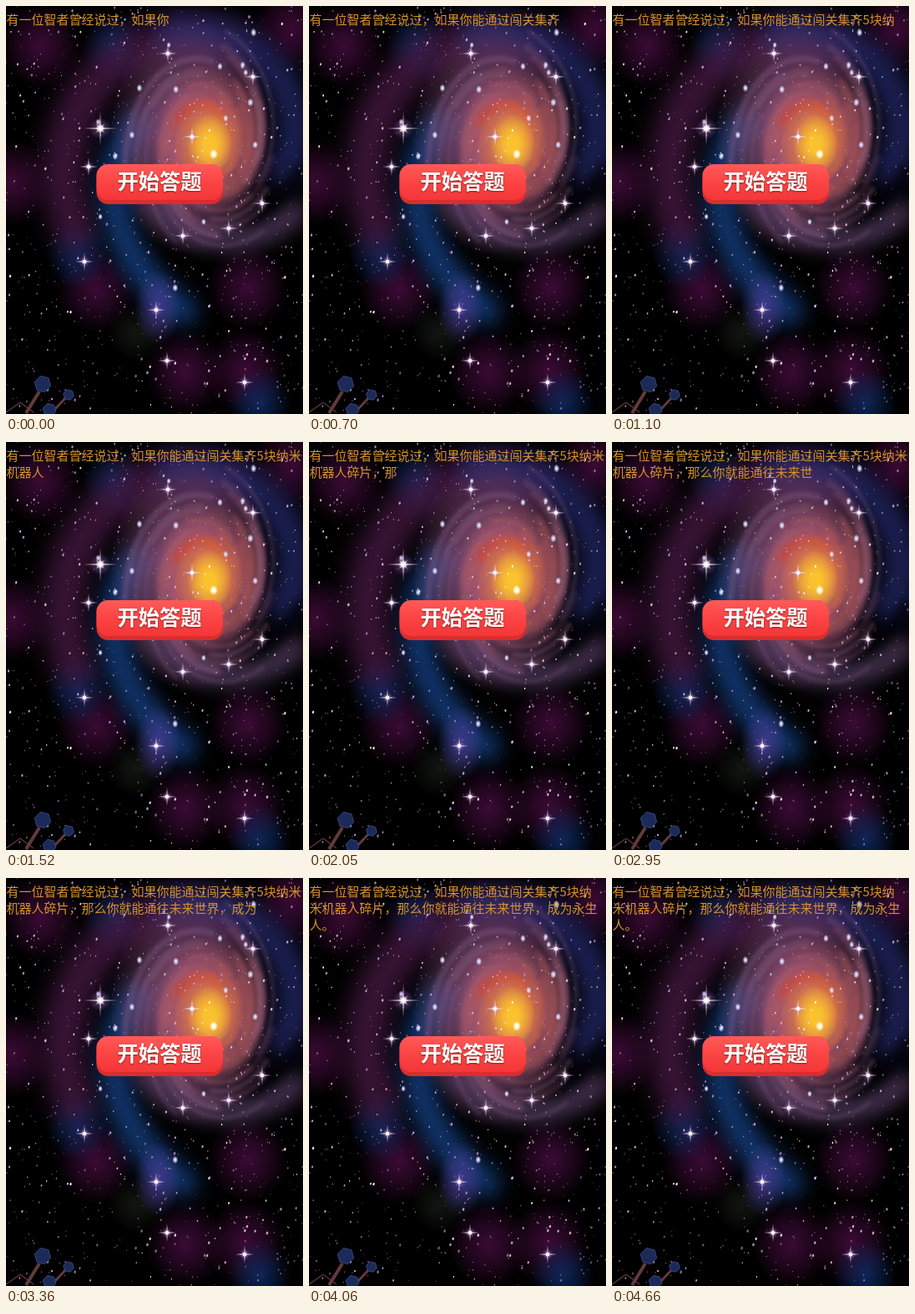
An HTML page with a canvas for the animation above (4.81 s loop, 356 by 490 pixels).

```html
<!DOCTYPE html>
<html lang="zh-CN">
<head>
<meta charset="utf-8">
<style>
html, body { margin: 0; width: 100%; height: 100%; overflow: hidden; background: #000; }
canvas { display: block; }
</style>
</head>
<body>
<canvas id="stage" width="356" height="490"></canvas>
<script>
const W = 356, H = 490, LOOP = 4810, STEP = 68.4;
const CENTER = { x: 243, y: 165 };
const FONT = '"Noto Sans CJK SC", "Noto Sans CJK", sans-serif';
const STORY = '有一位智者曾经说过，如果你能通过闯关集齐5块纳米机器人碎片，那么你就能通往未来世界，成为永生人。';
const ctx = document.getElementById('stage').getContext('2d');
const sky = document.createElement('canvas');
sky.width = W;
sky.height = H;
const g = sky.getContext('2d');

let seed = 71;
function random(low = 0, high = 1) {
  seed = (seed * 16807) % 2147483647;
  return low + (high - low) * seed / 2147483647;
}

const points = text => text.split(' ').map(pair => pair.split(',').map(Number));

function glow(x, y, rx, ry, rgb, alpha, core = 0) {
  g.save();
  g.translate(x, y);
  g.scale(rx, ry);
  const fade = g.createRadialGradient(0, 0, core, 0, 0, 1);
  fade.addColorStop(0, `rgba(${rgb},${alpha})`);
  fade.addColorStop(0.5, `rgba(${rgb},${alpha * 0.55})`);
  fade.addColorStop(1, `rgba(${rgb},0)`);
  g.fillStyle = fade;
  g.fillRect(-1, -1, 2, 2);
  g.restore();
}

// Logarithmic spiral, anticlockwise from angle `from` to `to` in degrees.
function arm(from, to, radius, growth, width, rgb, alpha, blur, squash = 1) {
  g.save();
  g.filter = `blur(${blur}px)`;
  g.lineWidth = width;
  g.lineCap = 'round';
  g.strokeStyle = `rgba(${rgb},${alpha})`;
  g.beginPath();
  for (let angle = from; angle <= to; angle += 3) {
    const a = angle * Math.PI / 180;
    const r = radius * Math.exp(growth * (angle - from) * Math.PI / 180);
    g.lineTo(CENTER.x + r * Math.cos(a) * squash, CENTER.y - r * Math.sin(a));
  }
  g.stroke();
  g.restore();
}

function paintNebulae() {
  for (const [x, y] of points('42,48 8,212 108,340 290,338 215,440 287,438 342,28')) {
    glow(x, y, 48, 52, '78,14,70', 0.75);
  }
  for (const [x, y] of points('86,297 304,478 130,48')) {
    glow(x, y, 38, 44, '18,52,120', 0.7);
  }
  glow(156, 392, 34, 34, '22,28,22', 0.8);
}

function paintGalaxy() {
  arm(75, 215, 118, 0.2, 50, '74,26,70', 0.75, 14);
  arm(-20, 110, 96, 0.17, 38, '34,38,98', 0.85, 13);
  arm(165, 262, 88, 0.5, 36, '20,62,126', 0.85, 12);
  glow(182, 362, 28, 46, '72,62,150', 0.85);
  glow(222, 158, 98, 142, '142,82,128', 0.9, 0.3);
  arm(225, 322, 98, 0.18, 30, '92,66,108', 0.65, 10);
  arm(298, 345, 104, 0.1, 13, '0,0,8', 0.7, 6);
  glow(243, 160, 68, 92, '196,98,106', 0.8, 0.25);

  // Fine strands: orange near the core, pink and then mauve further out.
  for (let i = 0; i < 54; i++) {
    const reach = i / 54, start = random(0, 360);
    const rgb = [214 - 76 * reach, 92 + 8 * reach, 58 + 90 * reach].map(Math.round);
    arm(start, start + random(50, 120), 28 + 72 * reach, 0.2,
      random(3, 10), rgb, random(0.15, 0.4), 2, 0.72);
  }
  arm(60, 150, 40, 0.2, 12, '198,66,58', 0.65, 4, 0.8);
  glow(243, 163, 42, 52, '232,136,58', 0.9, 0.15);
  glow(244, 166, 27, 36, '250,194,46', 1, 0.25);
}

function sparkle(x, y, r) {
  glow(x, y, r * 0.65, r * 0.65, '180,110,200', 0.5);
  g.fillStyle = '#fff4ff';
  for (let i = 0; i < 4; i++) {
    const length = i % 2 ? r * 0.4 : r;
    g.save();
    g.translate(x, y);
    g.rotate(i * Math.PI / 4);
    g.beginPath();
    g.moveTo(0, -length);
    g.lineTo(0.7, 0);
    g.lineTo(0, length);
    g.lineTo(-0.7, 0);
    g.fill();
    g.restore();
  }
  glow(x, y, r * 0.28, r * 0.28, '255,255,255', 1, 0.3);
}

function paintStars() {
  const tints = ['255,255,255', '235,190,245', '220,150,210', '190,190,245', '255,215,230'];
  for (let i = 0; i < 1000; i++) {
    const size = 0.4 + random() ** 3 * 0.9;
    g.fillStyle = `rgba(${tints[i % 5]},${random(0.4, 1)})`;
    g.beginPath();
    g.ellipse(random(0, W), random(0, H), size, size * 1.45, 0.25, 0, 7);
    g.fill();
  }
  for (let i = 0; i < 18; i++) {
    const r = random(2.6, 3.8);
    glow(random(110, 310), random(10, 350), r, r * 1.35, '220,220,255', 1, 0.25);
  }
  glow(249, 178, 5, 6, '255,255,235', 1, 0.35);
  for (const [x, y] of points('99,193 194,57 296,85 223,157 307,237 267,267 212,276 94,307 180,365 193,426 286,452')) {
    sparkle(x, y, 11);
  }
  sparkle(113, 147, 20);
}

function bar(x1, y1, x2, y2, width) {
  g.beginPath();
  g.moveTo(x1, y1);
  g.lineTo(x2, y2);
  g.lineWidth = width;
  g.strokeStyle = '#633a3c';
  g.stroke();
}

function hexagon(x, y, r) {
  g.beginPath();
  for (let i = 0; i < 6; i++) {
    const a = i * Math.PI / 3 + 0.25;
    g.lineTo(x + r * Math.cos(a), y + r * Math.sin(a));
  }
  g.closePath();
  g.fillStyle = '#1c2a58';
  g.strokeStyle = '#33467f';
  g.lineWidth = 1;
  g.fill();
  g.stroke();
}

function paintMolecule() {
  bar(0, 488, 17, 476, 1.2);
  bar(17, 476, 33, 488, 1.2);
  bar(24, 489, 40, 463, 4);
  bar(58, 485, 72, 470, 3);
  hexagon(44, 454, 10);
  hexagon(75, 467, 6.5);
  hexagon(52, 485, 8);
}

function drawButton() {
  const red = ctx.createLinearGradient(0, 190, 0, 234);
  red.addColorStop(0, '#ff5b59');
  red.addColorStop(0.45, '#fc4545');
  red.addColorStop(1, '#f43536');
  for (const [height, fill] of [[48, '#d92d2e'], [43, red]]) {
    ctx.fillStyle = fill;
    ctx.beginPath();
    ctx.roundRect(108.5, 190, 151.5, height, 14);
    ctx.fill();
  }
  ctx.save();
  ctx.font = `bold 25.3px ${FONT}`;
  ctx.textAlign = 'center';
  ctx.shadowColor = '#7d1f1f';
  ctx.shadowBlur = 2;
  ctx.shadowOffsetY = 1;
  ctx.fillStyle = '#fff';
  ctx.fillText('开始答题', 184, 220);
  ctx.restore();
}

function drawStory(time) {
  const tick = Math.floor(time / STEP);
  const count = Math.min(STORY.length, 13 + Math.floor(tick * 0.618 + 0.84));
  // The finished text reflows into slightly narrower lines.
  const perLine = count === STORY.length ? 23 : 24;
  ctx.font = `15px ${FONT}`;
  ctx.fillStyle = '#d4922b';
  for (let start = 0, y = 22; start < count; start += perLine, y += 20) {
    ctx.fillText(STORY.slice(start, Math.min(start + perLine, count)), 0.5, y);
  }
}

paintNebulae();
paintGalaxy();
paintStars();
paintMolecule();

function frame() {
  ctx.fillStyle = '#000';
  ctx.fillRect(0, 0, W, H);
  ctx.drawImage(sky, 0, 0);
  drawButton();
  drawStory(performance.now() % LOOP);
  requestAnimationFrame(frame);
}
frame();
</script>
</body>
</html>
```
